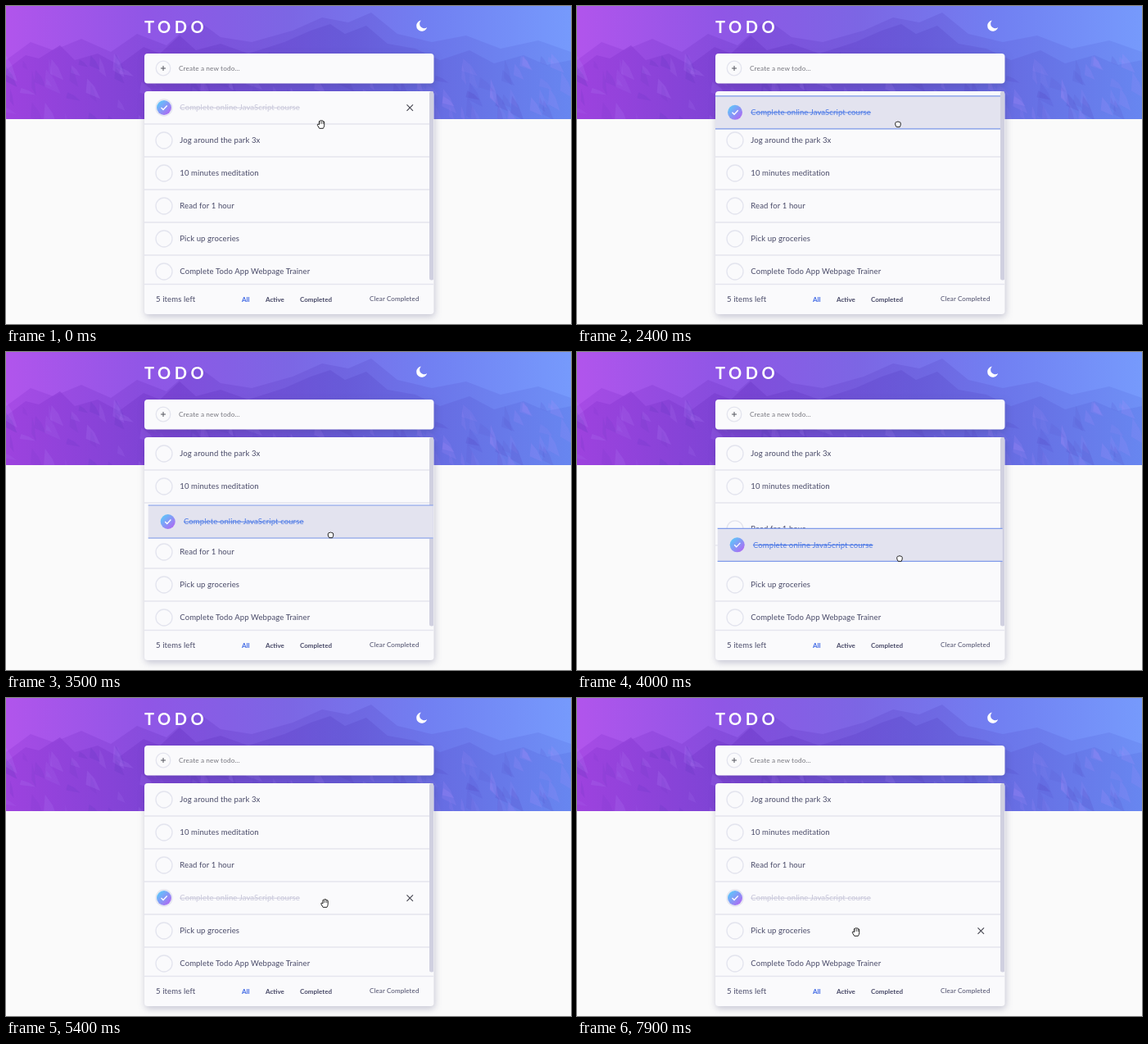
Write an HTML page that moves like this. It is 690x388 px and loops after 8000 ms.

```html
<!DOCTYPE html>
<html lang="en">
<head>
<meta charset="utf-8">
<title>Todo list</title>
<style>
  html, body { margin: 0; height: 100%; overflow: hidden; background: #fafafa; }
  svg { display: block; width: 100vw; height: 100vh; }
  text { font: 9.5px Lato, "Open Sans", sans-serif; letter-spacing: .12px; fill: #494a68; }
  text.title { font-size: 20px; font-weight: 700; letter-spacing: 4.5px; fill: #fff; }
  text.small { font-size: 8px; }
  text.bold { font-weight: 700; letter-spacing: 0; }
  text.hint { font-size: 8.2px; letter-spacing: .14px; fill: #74747c; }
  .done text { text-decoration: line-through; fill: #c9c8da; }
  .done.held text { fill: #4f7be6; }
  .ring { fill: none; stroke: #e3e4ee; stroke-width: 1.3; }
  .line { stroke: #e5e5ee; stroke-width: 1.4; }
  .cross { stroke: #4a4a55; stroke-width: 1.2; }
  .panel { fill: #fafafc; filter: drop-shadow(1px 3px 4px rgba(60, 60, 110, .28)); }
  .hand { fill: #fff; stroke: #222; stroke-width: 1; stroke-linejoin: round; stroke-linecap: round; }
</style>
</head>
<body>
<svg viewBox="0 0 690 388" preserveAspectRatio="none">
  <defs>
    <linearGradient id="sky">
      <stop offset="0" stop-color="#b155ec"/>
      <stop offset=".25" stop-color="#9056e6"/>
      <stop offset=".5" stop-color="#7c66e4"/>
      <stop offset=".75" stop-color="#7180f2"/>
      <stop offset="1" stop-color="#769afc"/>
    </linearGradient>
    <linearGradient id="rock">
      <stop offset="0" stop-color="#9a3fdc"/>
      <stop offset=".3" stop-color="#7541d0"/>
      <stop offset=".6" stop-color="#6557d6"/>
      <stop offset="1" stop-color="#6583ee"/>
    </linearGradient>
    <linearGradient id="tick" x2="1" y2="1">
      <stop offset="0.1" stop-color="#5cc8fa"/>
      <stop offset="1" stop-color="#b95cf2"/>
    </linearGradient>
    <clipPath id="banner"><path d="M0 0H690V138H0z"/></clipPath>
    <clipPath id="list"><path d="M169 104H522V339H169z"/></clipPath>
  </defs>

  <g clip-path="url(#banner)">
    <path d="M0 0H690V138H0z" fill="url(#sky)"/>
    <path fill="url(#rock)" opacity=".45" d="M0 66L30 44 58 54 92 40 128 56 160 34 196 48 232 16 262 38 300 44 350 30 386 14 418 20 446 8 478 34 520 44 562 36 604 52 650 42 690 56V138H0z"/>
    <path fill="url(#rock)" opacity=".75" d="M0 78L24 60 40 64 66 48 84 66 112 58 138 72 168 50 188 58 212 36 232 54 262 46 296 58 340 44 372 30 396 22 414 34 440 24 466 46 500 52 530 66 566 54 596 70 632 60 660 72 690 66V138H0z"/>
    <g id="facets"></g>
  </g>

  <text class="title" x="169" y="33">TODO</text>
  <path fill="#fff" d="M507 17.6a6.6 6.6 0 1 0 7.2 8.3a5.4 5.4 0 0 1 -7.2 -8.3z"/>

  <rect class="panel" x="169" y="58" width="353.5" height="36.500" rx="4"/>
  <circle class="ring" cx="192" cy="76" r="8.8"/>
  <path d="M189 76h6M192 73v6" stroke="#55565f"/>
  <text class="hint" x="211" y="79">Create a new todo...</text>

  <rect class="panel" x="169" y="104" width="353.5" height="272" rx="4"/>
  <g clip-path="url(#list)">
    <g id="rows"></g>
    <rect x="517" y="104" width="5.500" height="230.500" rx="2.500" fill="#d0d0e0"/>
    <g id="front"></g>
  </g>
  <path class="line" d="M169 339.500H522"/>
  <text x="183" y="360.500">5 items left</text>
  <text class="small bold" x="288" y="361" style="fill:#3f68e4">All</text>
  <text class="small bold" x="317" y="361">Active</text>
  <text class="small bold" x="359" y="361">Completed</text>
  <text class="small" x="444" y="360">Clear Completed</text>

  <g id="cursor">
    <g id="open" class="hand">
      <path d="M-2.500 5L-4.600 1.500Q-5.200 -.2 -3.400 .2L-2.600 1V-3Q-2.400 -4.300 -1.300 -3.500Q-.8 -5.400 .4 -4Q1.700 -5 2.100 -3.300Q3.700 -3.600 3.700 -2V1.600Q3.500 3.600 2.600 5z"/>
      <path d="M-1 -3V-.5M.7 -3.300V-.5M2.300 -2.800V-.3" stroke-width=".6"/>
    </g>
    <path id="fist" class="hand" d="M-2 3.300L-3.200 1V-1.200Q-2.800 -2.800 -1.300 -2.500Q0 -3.500 1.200 -2.500Q3 -2.700 3.200 -1V1.200L2.300 3.300z"/>
    <path id="arrow" d="M-1 -1V6.200L.8 4.800 2.100 7.300 3.300 6.700 2.100 4.200H4.200z" fill="#b9e884" stroke="#1f3a16"/>
  </g>
</svg>

<script>
const $ = id => document.getElementById(id);
const PITCH = 40, LOOP = 8000, GRAB = 2200, RELEASE = 4900;

// Cursor: time, x, y
const cursorPath = [
  [0, 385, 144], [1300, 385, 144], [1400, 387, 142], [1600, 387, 142],
  [1700, 390, 137], [1800, 391, 135], [2100, 391, 135], [2200, 392, 138],
  [2400, 392, 144], [3000, 396, 183], [3500, 396.5, 223], [3900, 395, 250],
  [4200, 392, 255], [4500, 392, 255], [4700, 389.5, 250], [5700, 389.5, 250],
  [6100, 373, 244], [6500, 373, 244], [6600, 363, 246], [6700, 361, 247],
  [7000, 361, 247], [7100, 355, 255], [7200, 355, 255], [7400, 349, 276],
  [7500, 349, 276], [7600, 345, 281], [7700, 343, 283], [7800, 343, 283], [7900, 341, 285]
];
// Dragged row: time, dx, dy
const dragPath = [
  [0, 0, 0], [2200, 0, 0], [2400, 0, 5.8], [3000, 4.3, 41.7], [3500, 4.7, 83],
  [3900, 3, 109], [4200, 2, 116], [4400, 2, 116], [4700, 0, 120]
];
const items = [
  { text: 'Complete online JavaScript course', done: true },
  { text: 'Jog around the park 3x', swap: 2600 },
  { text: '10 minutes meditation', swap: 3150 },
  { text: 'Read for 1 hour', swap: 3900 },
  { text: 'Pick up groceries' },
  { text: 'Complete Todo App Webpage Trainer' }
];

const clamp = v => Math.min(1, Math.max(0, v));
const easeOut = v => 1 - (1 - clamp(v)) ** 3;

function along(path, t) {
  const i = path.findIndex(k => k[0] > t);
  if (i < 0) return path.at(-1).slice(1);
  const [a, b] = [path[i - 1], path[i]];
  const f = (t - a[0]) / (b[0] - a[0]);
  return [a[1] + (b[1] - a[1]) * f, a[2] + (b[2] - a[2]) * f];
}

function buildFacets() {
  let seed = 7, out = '';
  const rnd = () => (seed = seed * 16807 % 2147483647) / 2147483647;
  for (let i = 0; i < 150; i++) {
    const x = rnd() * 700 - 5, y = 56 + rnd() * 80;
    const w = 5 + rnd() * 16, h = 8 + rnd() * 26;
    const color = rnd() < .55 ? '#4b32b4' : '#b792ff';
    out += `<path d="M${x} ${y}l${w * .5} ${h * .4} ${w * .4} ${h * .6} ${-w} ${-h * .3}z" fill="${color}" opacity="${.06 + rnd() * .12}"/>`;
  }
  $('facets').innerHTML = out;
}

// Rows are drawn around their vertical middle.
function rowMarkup({ text, done }) {
  const mark = done
    ? '<circle cx="193" r="9" fill="url(#tick)"/><path d="M189.500 0l2.500 2.500 4.700 -5" fill="none" stroke="#fff" stroke-width="1.300"/>'
    : '';
  const held = done
    ? '<g class="glow"><path d="M169 -20H517V20H169z" fill="#e3e3ef"/><path d="M169 -20H517M169 20H517" stroke="#7f9aea" stroke-width="1.200"/></g>'
    : '';
  return `<g class="${done ? 'done' : ''}"><path class="line" d="M169 20H517"/>${held}
    <circle class="ring" cx="193" r="10"/>${mark}<text x="212.300" y="3.200">${text}</text>
    <path class="cross" d="M489.500 -3.700l7.500 7.500m0 -7.500l-7.500 7.500"/></g>`;
}

buildFacets();
$('rows').innerHTML = items.slice(1).map(rowMarkup).join('');
$('front').innerHTML = rowMarkup(items[0]);
const rows = [$('front').firstChild, ...$('rows').children];
const crosses = rows.map(r => r.querySelector('.cross'));
const glow = rows[0].querySelector('.glow');
const ring = rows[0].querySelector('.ring');
const show = (el, on) => el.style.display = on ? '' : 'none';

function draw(now) {
  const t = Math.floor(now % LOOP / 100) * 100;
  const held = t >= GRAB && t < RELEASE;
  const hovered = held ? -1 : t < 7300 ? 0 : 4;

  rows.forEach((row, i) => {
    let [x, y] = i ? [0, 0] : along(dragPath, t);
    if (items[i].swap) y -= PITCH * easeOut((t - items[i].swap) / 300);
    row.setAttribute('transform', `translate(${x} ${124 + i * PITCH + y})`);
    show(crosses[i], i === hovered);
  });
  rows[0].classList.toggle('held', held);
  glow.style.opacity = t < GRAB ? 0 : 1 - clamp((t - RELEASE + 100) / 400) * (t >= RELEASE);
  show(ring, !held);

  const [cx, cy] = along(cursorPath, t);
  $('cursor').setAttribute('transform', `translate(${cx} ${cy})`);
  show($('open'), !held);
  show($('fist'), held && t < 4700);
  show($('arrow'), held && t >= 4700);
}

const start = performance.now();
(function tick() {
  draw(performance.now() - start);
  requestAnimationFrame(tick);
})();
</script>
</body>
</html>
```
